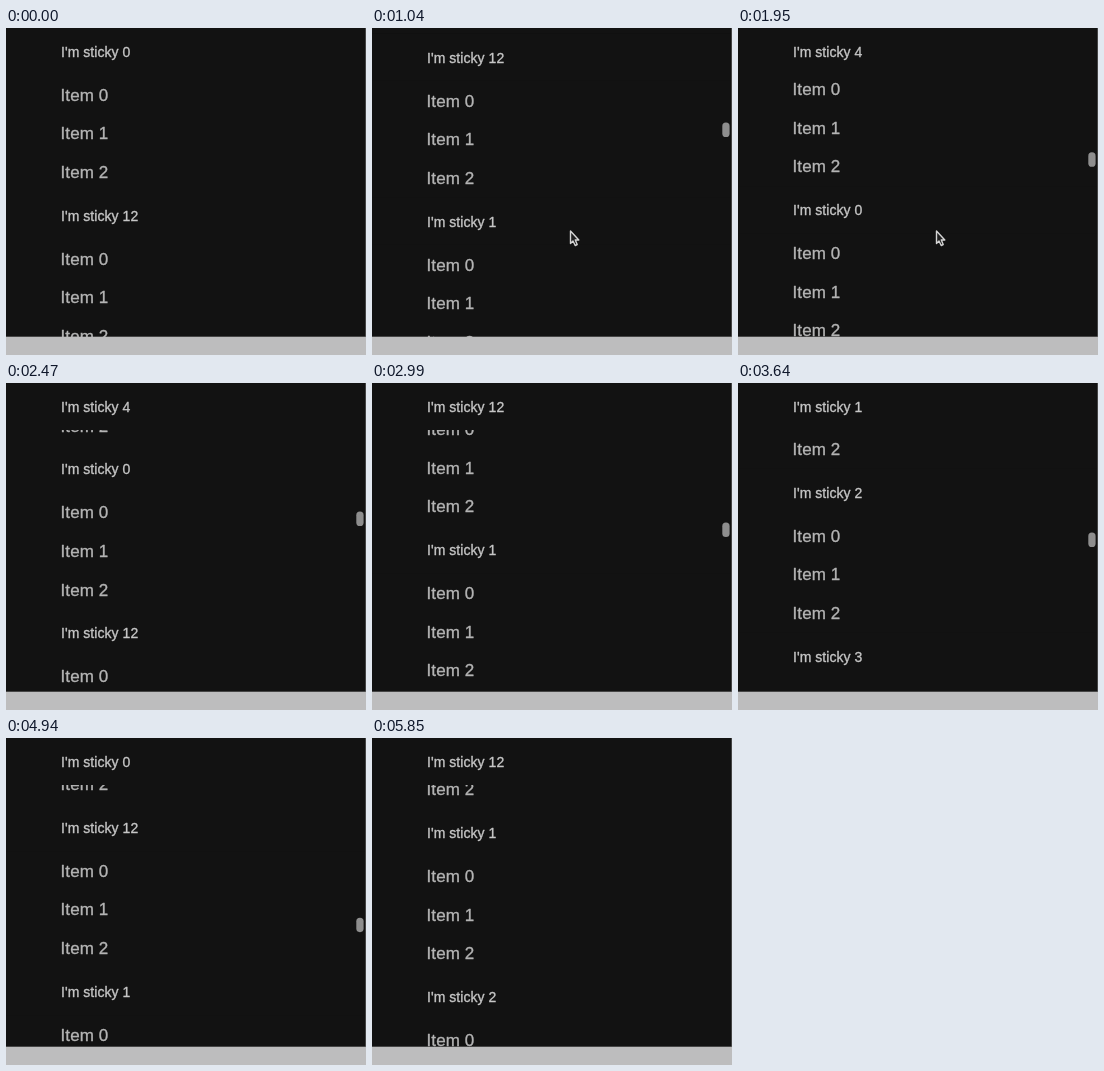
Write an HTML page with a canvas that moves like this. It is 360 px wide and 327 px high and loops after 7.02 s.

```html
<!DOCTYPE html>
<html lang="en">
<head>
<meta charset="utf-8">
<title>Sticky list headers</title>
<style>
  html, body { margin: 0; width: 100%; height: 100%; overflow: hidden; background: #121212; }
  canvas { display: block; }
</style>
</head>
<body>
<canvas id="stage" width="360" height="327"></canvas>
<script>
const ctx = document.getElementById('stage').getContext('2d');
const LOOP = 7020, TICK = 130;
const BG = '#121212';
const SECTION = 164, HEADER = 47, ITEM = 38.6;
const BAR_TOP = 308.7, THUMB_RATIO = 22.4;
const labels = [0, 12, 1, 2, 3, 4];

// Each flick of the wheel coasts to a stop
const flicks = [
  { start: 0, time: 2920, distance: 2900 },
  { start: 2730, time: 1240, distance: 467 },
  { start: 3900, time: 1192, distance: 550 },
  { start: 4860, time: 470, distance: 275.5 }
];

function easeOut(u) {
  const rest = 1 - Math.min(1, Math.max(0, u));
  return 1 - rest ** 3;
}

function scrollAt(t) {
  return flicks.reduce((sum, f) => sum + f.distance * easeOut((t - f.start) / f.time), 0);
}

function rect(x, y, w, h, color) {
  ctx.fillStyle = color;
  ctx.fillRect(x, y, w, h);
}

function text(str, x, y, size, color, spacing) {
  ctx.font = `${size}px "Liberation Sans", Arial, sans-serif`;
  ctx.letterSpacing = spacing + 'px';
  ctx.fillStyle = ctx.strokeStyle = color;
  ctx.lineWidth = 0.35;
  ctx.fillText(str, x, y);
  ctx.strokeText(str, x, y);
}

function drawSection(index, top) {
  for (let i = 0; i < 3; i++) {
    text('Item ' + i, 54.5, top + 72.7 + i * ITEM, 17, '#b4b4b4', 0.1);
  }
  // The header sticks to the top until the next section pushes it out
  const y = Math.max(top, Math.min(0, top + SECTION - HEADER));
  rect(0, y, 360, HEADER, BG);
  text("I'm sticky " + labels[index % labels.length], 55, y + 28.8, 14, '#c6c6c6', 0.05);
}

function drawThumb(pos, alpha) {
  ctx.globalAlpha = alpha;
  ctx.fillStyle = '#8e8e8e';
  ctx.beginPath();
  ctx.roundRect(350.3, pos / THUMB_RATIO - 0.4, 7.3, 14.5, 3.6);
  ctx.fill();
  ctx.globalAlpha = 1;
}

function drawCursor() {
  const arrow = new Path2D('M198.5 203V215.5L201 213L203.2 217.5L205.2 216.5L203.3 212H206.8Z');
  ctx.fillStyle = '#202020';
  ctx.fill(arrow);
  ctx.strokeStyle = '#d4d4d4';
  ctx.lineWidth = 1.4;
  ctx.lineJoin = 'round';
  ctx.stroke(arrow);
}

function draw(time) {
  const t = Math.floor((time % LOOP) / TICK) * TICK;
  const pos = scrollAt(t);
  const first = Math.floor(pos / SECTION);

  rect(0, 0, 360, 327, BG);
  for (let k = first; k < first + 3; k++) drawSection(k, k * SECTION - pos);
  if (t > 0 && t < 5850) drawThumb(pos, t < 5720 ? 1 : 0.5);
  if (t >= 260 && t < 2470) drawCursor();
  rect(359, 0, 1, BAR_TOP, '#444');
  rect(0, BAR_TOP, 360, 19, '#bdbdbe');
}

let start;
function loop(now) {
  start ??= now;
  draw(now - start);
  requestAnimationFrame(loop);
}
draw(0);
requestAnimationFrame(loop);
</script>
</body>
</html>
```
